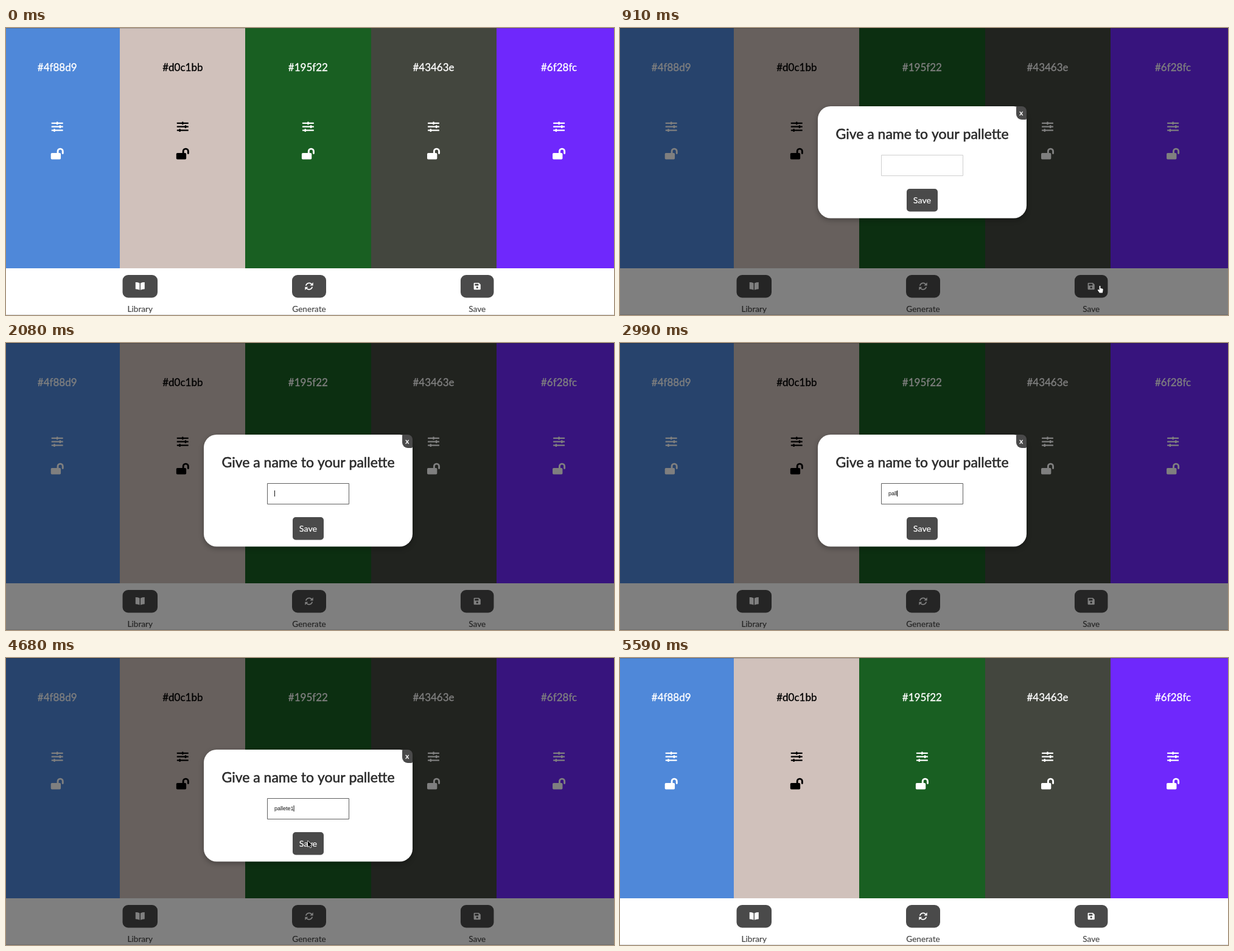
An HTML page with a canvas that plays this animation: 999 px wide and 473 px high, repeating every 5.98 s.

```html
<!DOCTYPE html>
<html lang="en">
<head>
<meta charset="utf-8">
<title>Colour palette</title>
<style>
  html, body { margin: 0; width: 100%; height: 100%; overflow: hidden; background: #fff; }
  canvas { display: block; width: 999px; height: 473px; }
</style>
</head>
<body>
<canvas id="stage" width="999" height="473"></canvas>
<script>
const ctx = document.getElementById('stage').getContext('2d');
const W = 999, H = 473, LOOP = 5980, STEP = 130;
const FONT = 'Lato, "Open Sans", sans-serif';
const DARK = '#4a4a4a';
const OPEN = 910, CLOSE = 4940, FOCUS = 1950;
const COLORS = ['#4f88d9', '#d0c1bb', '#195f22', '#43463e', '#6f28fc'];
const NAME = 'pallete1';
const KEYS = [2340, 2600, 2860, 2990, 3120, 3250, 3380, 3640];

const LOCK = new Path2D('M48 224H400Q448 224 448 272V464Q448 512 400 512H48Q0 512 0 464V272Q0 224 48 224Z');
const SHACKLE = new Path2D('M312 240V152A112 112 0 0 1 536 152V240');
const PAGE = new Path2D('M-.7 -5.2Q-3.6 -6.7 -7.5 -6.6V4.6Q-3.6 4.7 -.7 6.2Z');
const DISK = new Path2D('M-4.4 -5.6H2.8L5.6 -2.8V4.4Q5.6 5.6 4.4 5.6H-4.4Q-5.6 5.6 -5.6 4.4V-4.4Q-5.6 -5.6 -4.4 -5.6Z');
const ARROW = new Path2D('M0 0V9.5L2.2 7.5L3.8 11L5.4 10.3L3.9 6.9H6.8Z');
const HAND = new Path2D('M-1.7 -5.2Q-.7 -6.4 .1 -5.2V-1.5L3 -.9Q4.4 -.6 4.4 .8L3.6 6H-1.4L-4.3 1.8Q-4.6 .2 -3 .6L-1.7 1.8Z');

function at(x, y, draw, scale = 1) {
  ctx.save();
  ctx.translate(x, y);
  ctx.scale(scale, scale);
  draw();
  ctx.restore();
}

function box(x, y, w, h, r, color) {
  ctx.fillStyle = color;
  ctx.beginPath();
  ctx.roundRect(x, y, w, h, r);
  ctx.fill();
}

function label(text, x, y, size, color, bold = 0) {
  ctx.font = `${size}px ${FONT}`;
  ctx.textAlign = 'center';
  ctx.fillStyle = ctx.strokeStyle = color;
  ctx.fillText(text, x, y);
  if (bold) {
    ctx.lineWidth = bold;
    ctx.lineJoin = 'round';
    ctx.strokeText(text, x, y);
  }
}

function sliders(x, y, color) {
  [0, 4.7, -4.7].forEach((knob, i) => {
    const row = y + (i - 1) * 5.9;
    box(x - 9.5, row - 1.1, 19, 2.2, 0.6, color);
    box(x + knob - 1.2, row - 2.4, 2.4, 4.8, 0.6, color);
  });
}

function lock(x, y, color) {
  at(x - 10.5, y - 9.3, () => {
    ctx.fillStyle = ctx.strokeStyle = color;
    ctx.lineWidth = 80;
    ctx.lineCap = 'round';
    ctx.fill(LOCK);
    ctx.stroke(SHACKLE);
  }, 0.0365);
}

function book() {
  ctx.fillStyle = '#fff';
  ctx.fill(PAGE);
  ctx.scale(-1, 1);
  ctx.fill(PAGE);
}

function refresh() {
  ctx.fillStyle = ctx.strokeStyle = '#fff';
  ctx.lineWidth = 1.8;
  ctx.lineCap = 'butt';
  for (let i = 0; i < 2; i++) {
    ctx.beginPath();
    ctx.arc(0, 0, 5.3, Math.PI * 1.06, Math.PI * 1.8);
    ctx.stroke();
    ctx.beginPath();
    ctx.moveTo(6.7, -6.4);
    ctx.lineTo(6.7, -1.2);
    ctx.lineTo(1.5, -1.2);
    ctx.fill();
    ctx.rotate(Math.PI);
  }
}

function disk() {
  ctx.fillStyle = '#fff';
  ctx.fill(DISK);
  box(-3.8, -4, 6, 2.9, 0.3, DARK);
  ctx.beginPath();
  ctx.arc(0, 2.1, 1.6, 0, Math.PI * 2);
  ctx.fill();
}

function tool(x, w, text, icon) {
  box(x - w / 2, 407, w, 37.5, 9, DARK);
  at(x, 425.6, icon);
  label(text, x, 468, 13.6, DARK, 0.2);
}

function page() {
  ctx.fillStyle = '#fff';
  ctx.fillRect(0, 0, W, H);
  COLORS.forEach((color, i) => {
    const left = Math.max(0, Math.round(206.2 * i - 19));
    const x = 84.2 + 206.1 * i;
    const ink = i === 1 ? '#000' : '#fff';
    ctx.fillStyle = color;
    ctx.fillRect(left, 0, Math.min(W, Math.round(206.2 * i + 187.2)) - left, 396);
    label(color, x, 70.5, 17, ink, 0.35);
    sliders(x, 162.7, ink);
    lock(x, 207, ink);
  });
  tool(220.3, 57.5, 'Library', book);
  tool(498, 56, 'Generate', refresh);
  tool(774.2, 54.5, 'Save', disk);
  ctx.fillStyle = 'rgba(60,60,60,.3)';
  ctx.fillRect(0, 0, W, 1);
  ctx.fillStyle = '#dcdcdc';
  ctx.fillRect(0, 472, W, 1);
}

function caretOn(t) {
  const last = KEYS.filter(k => k <= t).pop() || FOCUS;
  return t >= FOCUS && Math.floor((t - last) / 500) % 2 === 0;
}

function dialog(t) {
  ctx.fillStyle = 'rgba(0,0,0,.5)';
  ctx.fillRect(0, 0, W, H);

  const u = Math.min(1, (t - OPEN) / 1170);
  const y = 151 - 22 * (1 - u) ** 2;
  ctx.save();
  ctx.shadowColor = 'rgba(0,0,0,.3)';
  ctx.shadowBlur = 8;
  ctx.shadowOffsetY = 3;
  box(325, y, 343, 184.5, 21, '#fff');
  ctx.restore();
  box(651, y, 17, 22, [2, 8, 2, 9], DARK);
  label('x', 659.3, y + 14.6, 12, '#fff', 0.4);
  label('Give a name to your pallette', 496.5, y + 53.8, 23, '#2c2c2c', 0.6);

  ctx.lineWidth = 1;
  ctx.strokeStyle = t >= FOCUS ? '#606060' : '#cfcfcf';
  ctx.strokeRect(429.5, Math.round(y + 80) + 0.5, 134, 34);

  const typed = NAME.slice(0, KEYS.filter(k => k <= t).length);
  ctx.font = '9px "Liberation Sans", Arial, sans-serif';
  ctx.textAlign = 'left';
  ctx.fillStyle = '#111';
  ctx.fillText(typed, 441, y + 100.3);
  if (caretOn(t)) ctx.fillRect(441 + ctx.measureText(typed).width, y + 92, 1, 10);

  box(471, y + 136, 51, 37.5, 5, DARK);
  label('Save', 496.5, y + 159.7, 14.3, '#fff', 0.2);
}

function glide(t, from, to, a, b) {
  const u = Math.max(0, Math.min(1, (t - from) / (to - from)));
  const e = u * u * (3 - 2 * u);
  return a.map((v, i) => v + (b[i] - v) * e);
}

function cursor(t) {
  const save = [789.3, 430.5], confirm = [496, 301.5];
  let pos, hand = false;
  if (t < 130) return;
  if (t < 1040) {
    pos = glide(t, 130, 520, [830, 490], save);
    hand = t >= 520;
  } else if (t < 1560) {
    pos = glide(t, 910, 1560, save, [500, 240]);
  } else if (t >= 4550 && t < 5590) {
    pos = t < 5070 ? glide(t, 4420, 4680, [494, 262], confirm)
                   : glide(t, 4940, 5590, confirm, [505, 490]);
    hand = t >= 4810 && t < CLOSE;
  } else return;
  at(...pos, () => {
    const shape = hand ? HAND : ARROW;
    ctx.lineWidth = 1.4;
    ctx.lineJoin = 'round';
    ctx.strokeStyle = hand ? '#222' : '#fff';
    ctx.fillStyle = hand ? '#fff' : '#000';
    ctx.stroke(shape);
    ctx.fill(shape);
  });
}

function frame(now) {
  const t = Math.floor((now % LOOP) / STEP) * STEP;
  page();
  if (t >= OPEN && t < CLOSE) dialog(t);
  cursor(t);
  requestAnimationFrame(frame);
}

let start;
requestAnimationFrame(function begin(now) {
  start = now;
  const loop = time => {
    const t = Math.floor(((time - start) % LOOP) / STEP) * STEP;
    page();
    if (t >= OPEN && t < CLOSE) dialog(t);
    cursor(t);
    requestAnimationFrame(loop);
  };
  loop(now);
});
</script>
</body>
</html>
```
